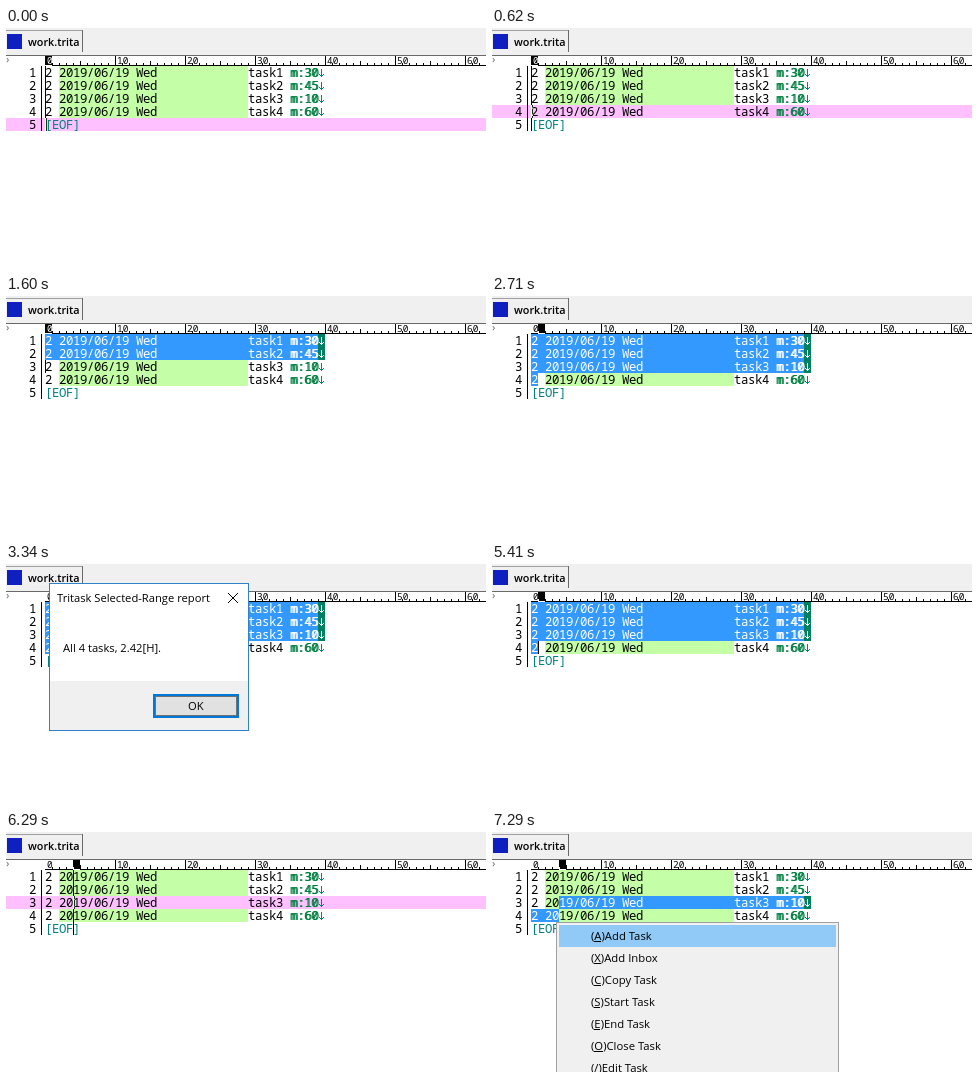
Recreate the animation shown at these times as an HTML page with a canvas. Size 480x240 px, loop 8000 ms.

```html
<!DOCTYPE html>
<html lang="en">
<head>
<meta charset="utf-8">
<title>Task editor</title>
<style>
  html, body { margin: 0; width: 100%; height: 100%; overflow: hidden; background: #fff; }
  canvas { display: block; }
</style>
</head>
<body>
<canvas id="stage" width="480" height="240"></canvas>
<script>
const ctx = document.getElementById('stage').getContext('2d');
const LOOP = 8000, LEFT = 39, TOP = 38, CELL = 7, LINE = 13;
const MONO = '"Noto Sans Mono", monospace', SANS = '"Open Sans", sans-serif';
const BLUE = '#3399ff', TEAL = '#008080', GREEN = '#008040';
const minutes = [30, 45, 10, 60];
const menuItems = ['(A)Add Task', '(X)Add Inbox', '(C)Copy Task', '(S)Start Task',
                   '(E)End Task', '(O)Close Task', '(/)Edit Task'];

// Each step changes only the listed fields; anchor is the selection start.
const steps = [
  { at: 0, row: 5, col: 0, caret: true, anchor: null, popup: null },
  { at: 370, caret: false },
  { at: 620, row: 4, caret: true },
  { at: 740, row: 3 },
  { at: 990, row: 2 },
  { at: 1110, row: 1 },
  { at: 1480, row: 2, anchor: { row: 1, col: 0 } },
  { at: 1600, row: 3 },
  { at: 1720, row: 4 },
  { at: 2090, col: 1 },
  { at: 2710, caret: false },
  { at: 2830, popup: 'menu' },
  { at: 3200, popup: null },
  { at: 3340, popup: 'dialog' },
  { at: 5410, popup: null, caret: true },
  { at: 5800, anchor: null, col: 2 },
  { at: 5920, col: 3 },
  { at: 6040, col: 4 },
  { at: 6290, row: 3 },
  { at: 6540, row: 4, anchor: { row: 3, col: 4 } },
  { at: 7040, caret: false },
  { at: 7290, popup: 'menu' }
];

const colX = col => LEFT + col * CELL;
const rowY = row => TOP + (row - 1) * LINE;

function box(x, y, w, h, color) {
  ctx.fillStyle = color;
  ctx.fillRect(x, y, w, h);
}

function invert(x, y, w, h) {
  ctx.globalCompositeOperation = 'difference';
  box(x, y, w, h, '#fff');
  ctx.globalCompositeOperation = 'source-over';
}

function frame(x, y, w, h, border, fill, width = 1) {
  box(x, y, w, h, border);
  box(x + width, y + width, w - 2 * width, h - 2 * width, fill);
}

function text(str, x, y, font, color = '#000') {
  ctx.font = font;
  ctx.fillStyle = color;
  ctx.fillText(str, x, y);
}

// Bold is a double strike, one pixel apart.
function cells(str, col, row, color, bold = false) {
  [...str].forEach((ch, i) => {
    for (let dx = 0; dx <= bold; dx++)
      text(ch, colX(col + i) + dx, rowY(row) + 11, `12.3px ${MONO}`, color);
  });
}

function lineEnd(row, color) {
  const x = colX(39), y = rowY(row);
  box(x + 3, y + 3, 1, 8, color);
  box(x + 2, y + 9, 3, 1, color);
  box(x + 1, y + 8, 1, 1, color);
  box(x + 5, y + 8, 1, 1, color);
}

function drawTab() {
  box(0, 0, 480, 27, '#f0f0f0');
  box(0, 27, 480, 1, '#696969');
  box(0, 2, 77, 1, '#a0a0a0');
  box(76, 2, 1, 22, '#696969');
  box(1, 6, 15, 15, '#1020c0');
  text('work.trita', 22, 18, `600 10.8px ${SANS}`);
}

function drawRuler(col) {
  text('›', 0, 35, `11px ${SANS}`, '#606060');
  box(LEFT, 37, 480 - LEFT, 1, '#000');
  for (let i = 0; colX(i) < 480; i++) {
    const height = i % 10 === 0 ? 10 : i % 5 === 0 ? 5 : 3;
    if (i > 0) box(colX(i), 38 - height, 1, height, '#000');
    if (i % 10 === 0) text(i, colX(i) + 2, 36, `9.5px ${MONO}`);
  }
  invert(colX(col), 28, CELL, 10);
}

function drawTask(row, selected) {
  const pick = color => selected ? '#fff' : color;
  cells('2 2019/06/19 Wed', 0, row, pick('#000'));
  cells('task' + row, 29, row, pick('#000'));
  cells('m:' + minutes[row - 1], 35, row, pick(GREEN), true);
  lineEnd(row, pick(TEAL));
}

function drawSelection({ row, col, anchor }) {
  for (let r = anchor.row; r <= row; r++) {
    const from = r === anchor.row ? anchor.col : 0;
    const to = r === row ? col : 40;
    if (to <= from) continue;
    ctx.save();
    ctx.beginPath();
    ctx.rect(colX(from), rowY(r), (to - from) * CELL, LINE);
    ctx.clip();
    box(LEFT, rowY(r), 39 * CELL, LINE, BLUE);
    box(colX(39), rowY(r), CELL, LINE, '#008060');
    drawTask(r, true);
    ctx.restore();
  }
}

function drawEditor(state) {
  const { row, col, caret, anchor } = state;
  for (let r = 1; r <= 5; r++) {
    if (r < 5) box(colX(2), rowY(r), 27 * CELL, LINE, '#c4ffa8');
    if (r === row && !anchor) box(0, rowY(r), 480, LINE, '#ffc0ff');
    text(r, 23, rowY(r) + 11, `12.3px ${MONO}`);
    if (r < 5) drawTask(r, false);
  }
  cells('[EOF]', 0, 5, TEAL);
  box(35, TOP, 1, 5 * LINE, '#000');
  if (anchor) drawSelection(state);
  else box(colX(col), TOP, 1, 5 * LINE, '#000');
  if (caret) invert(colX(col), rowY(row), anchor ? 1 : 2, LINE);
}

function drawMenu(x) {
  frame(x, 90, 283, 160, '#a0a0a0', '#f0f0f0');
  box(x + 3, 93, 277, 22, '#91c9f7');
  menuItems.forEach((item, i) => {
    const y = 108 + i * 22;
    text(item, x + 35, y, `11.3px ${SANS}`);
    const start = x + 35 + ctx.measureText('(').width;
    box(Math.round(start), y + 1, Math.round(ctx.measureText(item[1]).width), 1, '#000');
  });
}

function drawDialog() {
  const font = `11.2px ${SANS}`;
  frame(43, 19, 200, 148, '#2f82c8', '#fff');
  box(44, 117, 198, 49, '#f0f0f0');
  text('Tritask Selected-Range report', 51, 38, font);
  text('All 4 tasks, 2.42[H].', 57, 88, font);
  frame(147, 130, 86, 24, '#0078d7', '#e1e1e1', 2);
  text('OK', 182, 146, font);
  ctx.strokeStyle = '#000';
  ctx.lineWidth = 1;
  ctx.setLineDash([1, 1]);
  ctx.strokeRect(149.5, 132.5, 81, 19);
  ctx.setLineDash([]);
  ctx.beginPath();
  ctx.moveTo(222, 29);
  ctx.lineTo(232, 39);
  ctx.moveTo(232, 29);
  ctx.lineTo(222, 39);
  ctx.stroke();
}

function render(now) {
  const time = now % LOOP;
  const state = Object.assign({}, ...steps.filter(step => step.at <= time));
  box(0, 0, 480, 240, '#fff');
  drawTab();
  drawRuler(state.col);
  drawEditor(state);
  if (state.popup === 'menu') drawMenu(colX(state.col) - 3);
  if (state.popup === 'dialog') drawDialog();
}

const began = performance.now();
function tick() {
  render(performance.now() - began);
  requestAnimationFrame(tick);
}
tick();
</script>
</body>
</html>
```
